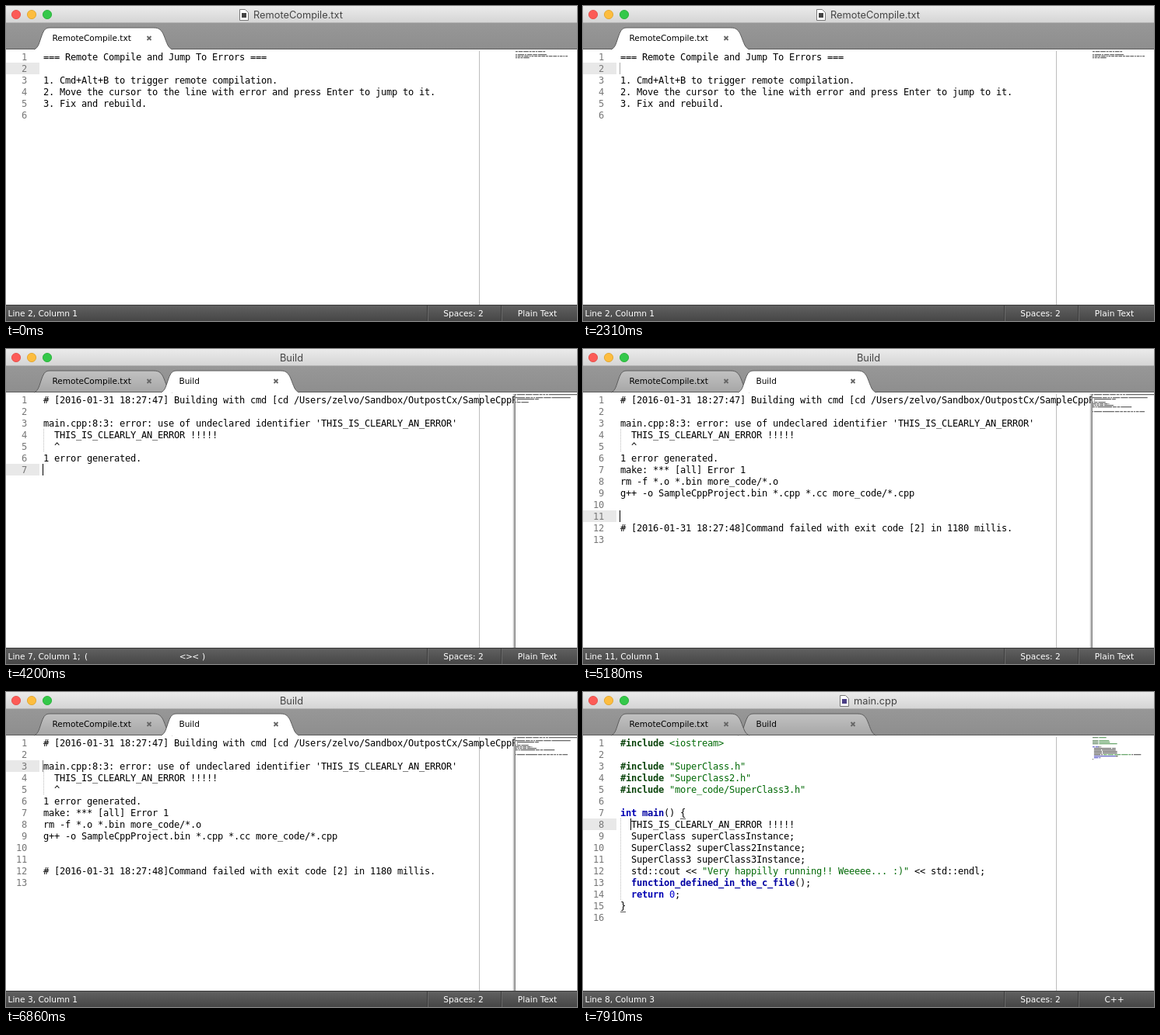
An HTML page that plays this animation: 734 px wide and 406 px high, repeating every 8000 ms.

```html
<!DOCTYPE html>
<html lang="en">
<head>
<meta charset="utf-8">
<title>Remote build</title>
<style>
  html, body { margin: 0; width: 100%; height: 100%; overflow: hidden; background: #fff; }
  svg { display: block; width: 100%; height: 100%; }
  text { white-space: pre; }
  .code { font: 12px "DejaVu Sans Mono", monospace; letter-spacing: -0.2246px; }
  .ui { font: 10.6px "DejaVu Sans", sans-serif; }
  .title { font: 12.8px Inter, sans-serif; fill: #444; }
</style>
</head>
<body>
<svg id="stage" viewBox="0 0 734 406" xmlns="http://www.w3.org/2000/svg">
  <defs>
    <linearGradient id="bar" x2="0" y2="1"><stop stop-color="#ebebeb"/><stop offset="1" stop-color="#d4d4d4"/></linearGradient>
    <linearGradient id="strip" x2="0" y2="1"><stop stop-color="#979797"/><stop offset="1" stop-color="#8e8e8e"/></linearGradient>
    <linearGradient id="idle" x2="0" y2="1"><stop stop-color="#c2c2c2"/><stop offset="1" stop-color="#a6a6a6"/></linearGradient>
    <linearGradient id="status" x2="0" y2="1"><stop stop-color="#626262"/><stop offset="1" stop-color="#464646"/></linearGradient>
    <linearGradient id="shade"><stop stop-color="#777" stop-opacity="0"/><stop offset="1" stop-color="#777"/></linearGradient>
    <clipPath id="pane"><rect y="56" width="654" height="329"/></clipPath>
  </defs>
  <g id="view"></g>
</svg>
<script>
const LOOP = 8000, TICK = 70, CHAR = 7, ROW = 15, LEFT = 48, TOP = 58;

const NOTE = `=== Remote Compile and Jump To Errors ===

1. Cmd+Alt+B to trigger remote compilation.
2. Move the cursor to the line with error and press Enter to jump to it.
3. Fix and rebuild.
`.split('\n');

const LOG = `# [2016-01-31 18:27:47] Building with cmd [cd /Users/zelvo/Sandbox/OutpostCx/SampleCppProject && make clean all]

main.cpp:8:3: error: use of undeclared identifier 'THIS_IS_CLEARLY_AN_ERROR'
  THIS_IS_CLEARLY_AN_ERROR !!!!!
  ^
1 error generated.
make: *** [all] Error 1
rm -f *.o *.bin more_code/*.o
g++ -o SampleCppProject.bin *.cpp *.cc more_code/*.cpp


# [2016-01-31 18:27:48]Command failed with exit code [2] in 1180 millis.
`.split('\n');

const MAIN = `#include <iostream>

#include "SuperClass.h"
#include "SuperClass2.h"
#include "more_code/SuperClass3.h"

int main() {
  THIS_IS_CLEARLY_AN_ERROR !!!!!
  SuperClass superClassInstance;
  SuperClass2 superClass2Instance;
  SuperClass3 superClass3Instance;
  std::cout << "Very happilly running!! Weeeee... :)" << std::endl;
  function_defined_in_the_c_file();
  return 0;
}
`.split('\n');

const OPEN = 3220, DONE = 4550, SELECT = 6930, JUMP = 7910;

// Caret positions: [time, line, column]
const MOVES = [
  [-999, 2, 1], [OPEN, 3, 1], [3920, 7, 1], [4270, 8, 1], [4340, 10, 1], [4480, 13, 1], [5110, 12, 1],
  ...[11, 10, 9, 8, 7, 6, 5, 4].map((line, i) => [5180 + 140 * i, line, 1]),
  [6370, 3, 1], [SELECT, 3, 77], [JUMP, 8, 3]
];
// Caret blinking: [time, ticks, final opacity]
const FADES = [
  [-280, 4, 0], [140, 4, 1], [630, 4, 0], [1190, 5, 1], [1680, 4, 0], [2310, 3, 1], [2730, 4, 0],
  [3640, 4, 0], [4900, 4, 0], [6790, 4, 0], [7350, 4, 0]
];

const esc = s => s.replace(/&/g, '&amp;').replace(/</g, '&lt;');
const rect = (x, y, w, h, fill, more = '') =>
  `<rect x="${x}" y="${y}" width="${w}" height="${h}" fill="${fill}" ${more}/>`;
const label = (cls, x, y, s, more = '') => `<text class="${cls}" x="${x}" y="${y}" ${more}>${esc(s)}</text>`;
const last = (list, t) => list.filter(e => e[0] <= t).pop();
const rowTop = line => TOP + ROW * (line - 1);

function caretAlpha(t) {
  const [start, ticks, to] = last(FADES, t);
  if (last(MOVES, t)[0] > start) return 1;
  const p = Math.min(1, ((t - start) / TICK + 1) / ticks);
  return to ? p : 1 - p;
}

const TOKEN = /(#include|"[^"]*"|<iostream>|\bint\b|\breturn\b|\bmain\b|\b0\b|function_\w+)/;

function tokens(line, isCode) {
  if (!isCode) return [[line, '#000', false]];
  return line.split(TOKEN).map((s, i) => {
    if (i % 2 === 0) return [s, '#000', false];
    if (s === '#include') return [s, '#0c450d', true];
    if (/^["<]/.test(s)) return [s, '#036a07', false];
    if (s === '0') return [s, '#0000cd', false];
    return [s, /^(int|return)$/.test(s) ? '#0000b4' : '#0000a2', true];
  });
}

function codeLine(line, i, isCode) {
  const spans = tokens(line, isCode).map(([s, fill, bold]) =>
    `<tspan fill="${fill}"${bold ? ' font-weight="bold"' : ''}>${esc(s)}</tspan>`).join('');
  return `<text class="code" x="${LEFT}" y="${rowTop(i + 1) + 12}">${spans}</text>`;
}

function mapLine(line, i, isCode) {
  let col = 0, out = '';
  for (const [s, fill] of tokens(line, isCode)) {
    for (const m of s.matchAll(/\S+/g))
      out += rect(655 + (col + m.index) * 0.93, 58 + 2 * i, m[0].length * 0.93, 1.3, fill, 'opacity=".58"');
    col += s.length;
  }
  return out;
}

function tab(x, name, active) {
  const c = `M${x + 179} 38.5l5 5m0-5l-5 5`;
  return `<path transform="translate(${x - 5})" d="M41 56C47 54 48 46 51 38C54 30 56 28 62 28H195C202 28 205 31 208 38C212 48 213 54 219 56"
      fill="${active ? '#fff' : 'url(#idle)'}" stroke="#5c5c5c"/>
    ${label('ui', x + 60 - 0.5, 45, name, 'style="font-size:10.5px"')}
    <path d="${c}" transform="translate(2.5 .5)" stroke="#666" stroke-width="1.8"/>`;
}

function pageIcon(x, fill) {
  return `<path d="M${x} 4.5h7l4 4v10h-11z" fill="#fff" stroke="#777"/>` + rect(x + 2.5, 9, 6, 6, fill);
}

function titleBar(mode) {
  const lights = [['#fc5b57', '#e2463f'], ['#fdbd3f', '#dfa023'], ['#34c84a', '#1dac2c']].map(([fill, edge], i) =>
    `<circle cx="${13 + 20 * i}" cy="11" r="5.6" fill="${fill}" stroke="${edge}" stroke-width=".8"/>`).join('');
  const title = mode === 'note' ? pageIcon(300.5, '#444') + label('title', 318, 16, 'RemoteCompile.txt')
    : mode === 'log' ? label('title', 367, 16, 'Build', 'text-anchor="middle"')
    : pageIcon(330.5, '#4b3f86') + label('title', 348, 16, 'main.cpp');
  return rect(0, 0, 734, 22, 'url(#bar)') + rect(0, 21, 734, 1, '#b4b4b4') + lights + title;
}

function tabBar(mode) {
  const note = tab(0, 'RemoteCompile.txt', mode === 'note');
  const build = mode === 'note' ? '' : tab(163, 'Build', mode === 'log');
  const edge = rect(0, 55, 734, 1, '#5c5c5c');
  const body = mode === 'note' ? edge + note : mode === 'log' ? note + edge + build : build + note + edge;
  return rect(0, 22, 734, 34, 'url(#strip)') + body;
}

function fish(t, line) {
  const end = 35, path = 1 + 2.5 * (t - OPEN) / TICK;
  const back = path > end, pos = Math.floor(back ? 2 * end - path : path);
  const dx = line > 9 ? 7 : 0;
  return label('ui', 101 + dx, 400, '(') +
    label('ui', 105.5 + dx + 3.45 * pos, 400, back ? '<><' : '><>', 'letter-spacing="-.6"') +
    label('ui', 252 + dx, 400, ')');
}

function statusBar(t, mode, line, col) {
  const busy = t >= OPEN && t < DONE, selected = t >= SELECT && t < JUMP;
  const where = selected ? '76 characters selected' : `Line ${line}, Column ${col}`;
  const mid = 'text-anchor="middle"';
  return rect(0, 385, 734, 21, 'url(#status)') + rect(0, 385, 734, 1, '#3a3a3a') +
    [541, 636].map(x => rect(x, 386, 1, 20, '#3c3c3c') + rect(x + 1, 386, 1, 20, '#6a6a6a')).join('') +
    `<g fill="#fff">${label('ui', 2.5, 400, where + (busy ? ';' : ''))}${busy ? fish(t, line) : ''}
    ${label('ui', 588, 400, 'Spaces: 2', mid)}${label('ui', 683, 400, mode === 'main' ? 'C++' : 'Plain Text', mid)}</g>`;
}

function guide(from, to) {
  return `<path d="M48.5 ${rowTop(from)}V${rowTop(to + 1)}" stroke="#bbb" stroke-dasharray="1 1"/>`;
}

function editor(t, mode, line, col) {
  const isCode = mode === 'main', isLog = mode === 'log';
  const rows = isLog ? Math.max(...MOVES.filter(m => m[0] <= t).map(m => m[1])) : 0;
  const lines = isLog ? LOG.slice(0, rows - 1).concat('') : isCode ? MAIN : NOTE;
  const numbers = lines.map((_, i) => {
    const n = String(i + 1);
    return label('code', 27 - CHAR * n.length, rowTop(i + 1) + 12, n, 'fill="#777"');
  }).join('');
  const selected = isLog && t >= SELECT;
  const x = LEFT - 1 + CHAR * (col - 1);

  let out = rect(0, 56, 734, 329, '#fff') + rect(0, rowTop(line), 43, ROW, '#e8e8e8') + numbers;
  out += '<g clip-path="url(#pane)">';
  if (selected) out += rect(LEFT, rowTop(3), 76 * CHAR, ROW, '#c4ddff', 'rx="2"');
  out += rect(608, 58, 1, 327, '#bdbdbd');
  if (isLog && rows > 5) out += guide(4, 5);
  if (isCode) out += guide(8, 14) + rect(125, 163, 7, 1, '#555') + rect(48, 283, 7, 1, '#555');
  out += lines.map((s, i) => codeLine(s, i, isCode)).join('');
  out += rect(x, rowTop(line), 1, ROW, '#000', `opacity="${caretAlpha(t)}"`) + '</g>';
  if (isLog) out += rect(651, 58, 4, 327, 'url(#shade)');
  if (selected) out += rect(655, 61.5, 71, 2.2, '#c4ddff');
  return out + lines.map((s, i) => mapLine(s, i, isCode)).join('');
}

const view = document.getElementById('view');
let shown = -1;

function draw(time) {
  const t = Math.floor((time % LOOP) / TICK) * TICK;
  if (t === shown) return;
  shown = t;
  const mode = t < OPEN ? 'note' : t < JUMP ? 'log' : 'main';
  const [, line, col] = last(MOVES, t);
  view.innerHTML = editor(t, mode, line, col) + titleBar(mode) + tabBar(mode) + statusBar(t, mode, line, col);
}

const begin = performance.now();
function loop() {
  draw(performance.now() - begin);
  requestAnimationFrame(loop);
}
loop();
</script>
</body>
</html>
```
